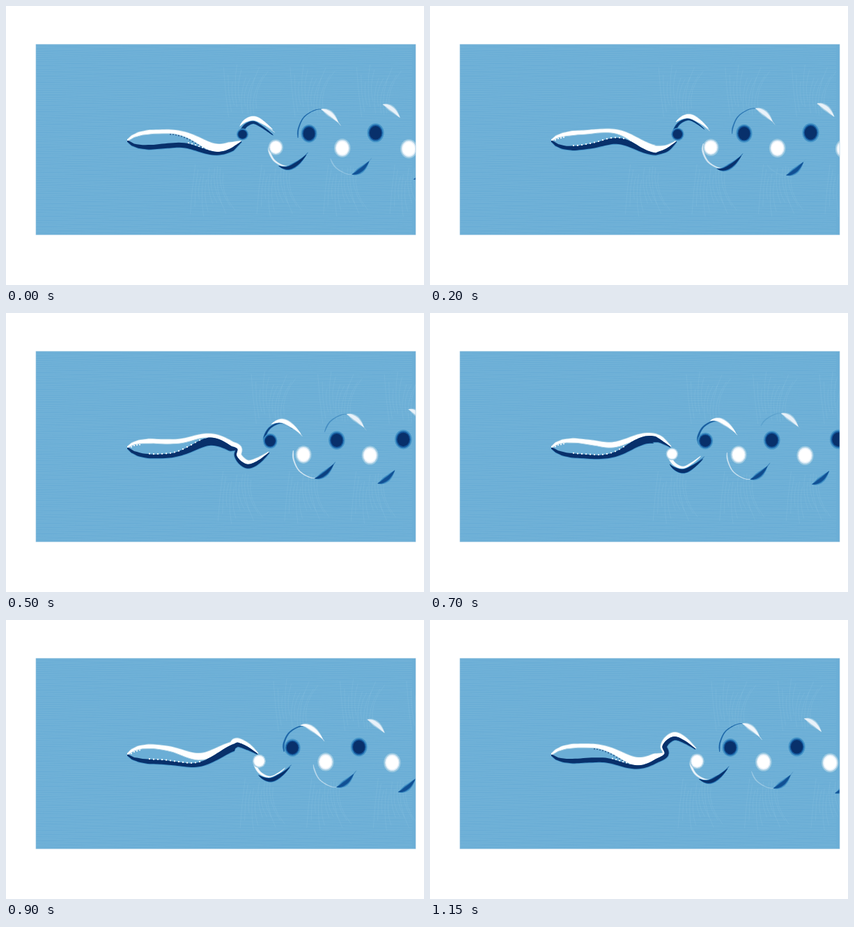
Animation of 600x400 px, one loop 1.2 s. Source, as an HTML page with a canvas:

```html
<!DOCTYPE html>
<html lang="en">
<head>
<meta charset="utf-8">
<title>Swimmer wake</title>
<style>
  html, body { margin: 0; width: 100%; height: 100%; overflow: hidden; background: #fff; }
  canvas { display: block; }
</style>
</head>
<body>
<canvas id="stage" width="600" height="400"></canvas>
<script>
const ctx = document.getElementById('stage').getContext('2d');
const LOOP = 1200, STEP = 50;
const BOX = { x: 43, y: 55, w: 545, h: 273 };
const MID = 193, NOSE = 174, SHED = 339.5, WAVE = 95.5;
const SEA = '#6baed6';
const DARK = ['#4292c6', '#155a9f', '#08306b'];
const LIGHT = ['#9ecae1', '#e3eef8', '#ffffff'];

const clamp = (v, a = 0, b = 1) => Math.min(b, Math.max(a, v));
const mix = (a, b, k) => a + (b - a) * k;
const mixAll = (a, b, k) => a.map((v, i) => mix(v, b[i], k));

function seeded(seed) {
  return () => {
    seed = (seed * 16807) % 2147483647;
    return seed / 2147483647;
  };
}

// Piecewise linear lookup in [x, value] pairs
function lookup(table, x) {
  let i = 1;
  while (i < table.length - 1 && table[i][0] < x) i++;
  const [a, b] = [table[i - 1], table[i]];
  return mix(a[1], b[1], clamp((x - a[0]) / (b[0] - a[0])));
}

// Catmull-Rom through points of any dimension
function spline(pts, n = 8) {
  const out = [], last = pts.length - 1;
  for (let i = 0; i < last; i++) {
    const [a, b, c, d] = [pts[Math.max(0, i - 1)], pts[i], pts[i + 1], pts[Math.min(last, i + 2)]];
    for (let j = 0; j < n; j++) {
      const t = j / n;
      out.push(b.map((v, m) => v + 0.5 * t * (c[m] - a[m] +
        t * (2 * a[m] - 5 * v + 4 * c[m] - d[m] + t * (3 * (v - c[m]) + d[m] - a[m])))));
    }
  }
  out.push(pts[last]);
  return out;
}

// Unit normal on the left of the direction of travel
function normal(pts, i) {
  const a = pts[Math.max(0, i - 1)], b = pts[Math.min(pts.length - 1, i + 1)];
  const dx = b[0] - a[0], dy = b[1] - a[1], len = Math.hypot(dx, dy) || 1;
  return [dy / len, -dx / len];
}

// Fills the strip between two offsets of a path
function strip(pts, from, to, color) {
  const edge = off => pts.map((p, i) => {
    const n = normal(pts, i), d = off(p, i / (pts.length - 1));
    return [p[0] + n[0] * d, p[1] + n[1] * d];
  });
  fillPath(edge(from).concat(edge(to).reverse()), color);
}

function fillPath(pts, color) {
  ctx.fillStyle = color;
  ctx.beginPath();
  pts.forEach(p => ctx.lineTo(p[0], p[1]));
  ctx.closePath();
  ctx.fill();
}

function dot(x, y, r, color) {
  ctx.fillStyle = color;
  ctx.beginPath();
  ctx.arc(x, y, r, 0, 7);
  ctx.fill();
}

// Body: a wave that travels and grows towards the tail
const HALF = [[174, 1.5], [180, 7], [190, 11.5], [205, 14], [235, 13.2], [265, 10.5], [290, 8.6], [326, 6.8]];
const HOLLOW = [[176, 0], [184, 4.5], [195, 7], [212, 7.8], [240, 6.5], [265, 3.2], [288, 0]];

function sway(x, t) {
  const amp = 0.8 + 13.8 / (1 + Math.exp((266 - x) / 19));
  return amp * Math.cos(2 * Math.PI * (t - (x - 300) * 7.5) / LOOP) * clamp((x - NOSE) / 20);
}

const sheetY = (x, t) => MID + 1.25 * sway(x, t);

function bodyPoint(x, t) {
  const half = lookup(HALF, x), lean = 0.25 * sway(x, t);
  return [x, sheetY(x, t), half + lean, half - lean];
}

// Shape of the sheet as it rolls up, relative to its vortex
const ROLL = [[1, -1], [-4, -13], [3, -24], [16, -29], [30, -22], [46, -10]];
const FLAT_X = [0, 6, 12, 18, 32, 46];

function newestSheet(t) {
  const s = t < LOOP / 2 ? -1 : 1;
  const x0 = SHED - WAVE / 2 + WAVE * (t % (LOOP / 2)) / LOOP;
  const r = clamp((x0 - 316) / 24);
  const end = x0 < 316 ? 324 : Math.min(324, x0 - 8);
  const pts = [];
  for (let x = NOSE; x < end; x += 3) pts.push(bodyPoint(x, t));
  const tail = [bodyPoint(end, t)];
  ROLL.forEach((p, i) => {
    const fx = x0 + FLAT_X[i];
    const fy = i < 4 ? sheetY(fx, t) : MID - s * (i === 4 ? 11 : 1);
    if (r === 0 && fx <= end + 3) return;
    const main = mix([6.5, 6.5, 6.5, 6, 4.5, 1][i], [6, 6.5, 6, 5, 3.5, 1][i], r);
    const other = mix([6.5, 6.5, 6.5, 6, 4.5, 1][i], [2, 1.5, 4, 6, 4.5, 1][i], r);
    tail.push([
      mix(fx, x0 + p[0], r), mix(fy, MID + s * p[1], r),
      s > 0 ? other : main, s > 0 ? main : other
    ]);
  });
  return pts.concat(spline(tail));
}

function drawSwimmer(t) {
  const sheet = newestSheet(t);
  const zero = () => 0;
  strip(sheet, zero, p => p[2] + 0.9, LIGHT[0]);
  strip(sheet, zero, p => -p[3] - 0.9, DARK[0]);
  strip(sheet, zero, p => p[2], LIGHT[2]);
  strip(sheet, zero, p => -p[3], DARK[2]);

  const top = [], bottom = [];
  for (let x = 176; x <= 288; x += 4) {
    const y = sheetY(x, t), h = lookup(HOLLOW, x);
    top.push([x, y - h]);
    bottom.push([x, y + h]);
  }
  fillPath(top.concat(bottom.reverse()), SEA);
  ctx.strokeStyle = LIGHT[0];
  ctx.lineWidth = 1;
  ctx.beginPath();
  top.forEach(p => ctx.lineTo(p[0], p[1]));
  ctx.stroke();

  // Specks along the inner skin
  if (t >= 200 && t < 1000) {
    for (let x = 206; x < 284; x += 6)
      dot(x, sheetY(x, t) + lookup(HOLLOW, x) - 0.5, 1.1, '#fff');
    for (let x = 180; x < 196; x += 4)
      dot(x, sheetY(x, t) - lookup(HOLLOW, x) + 1, 1, '#fff');
  } else {
    for (let x = 236; x < 286; x += 4)
      dot(x, sheetY(x, t) - lookup(HOLLOW, x) + 1, 0.8, DARK[2]);
    for (let x = 262; x < 284; x += 5)
      dot(x, sheetY(x, t) + lookup(HOLLOW, x) - 1, 1, '#fff');
  }
}

// Wake: mirrored vortices with an arm and a satellite
const ARM_YOUNG = [[0, -5], ...ROLL.slice(1)];
const ARM_OLD = [[-16, -4], [-15, -18], [-6, -35], [14, -45], [31, -38], [46, -21]];

function layered(pts, colors, width, offset, solid, alpha) {
  const grow = [1, mix(0.62, 0.88, solid), mix(0.3, 0.76, solid)];
  grow.forEach((g, i) => {
    ctx.globalAlpha = alpha * (i === 2 ? clamp(solid * 2) : 1);
    strip(pts, (p, u) => offset + width(u) * g / 2, (p, u) => offset - width(u) * g / 2, colors[i]);
  });
  ctx.globalAlpha = 1;
}

function drawArm(x0, s) {
  const k = (x0 - SHED) / WAVE, old = clamp(k) ** 0.8, drift = 7 * Math.max(0, k - 1);
  const arm = spline(ARM_YOUNG.map((p, i) => {
    const [x, y] = mixAll(p, ARM_OLD[i], old);
    return [x0 + x - drift, MID + s * (y - drift)];
  }), 12);
  const part = (a, b) => arm.slice(Math.round(a * 60), Math.round(b * 60) + 1);
  const [main, other] = s > 0 ? [DARK, LIGHT] : [LIGHT, DARK];

  const fade = clamp((1.7 - k) / 0.7);
  if (fade > 0) {
    const w = mix(7.5, 2.6, old);
    layered(part(clamp(k - 1) * 0.5, mix(1, 0.68, old)), main,
      u => w * (1 - u) ** 0.5 * clamp(0.4 + u * 4), -s * mix(3, 0, old), clamp(1 - 1.5 * k), 0.85 * fade);
  }

  const mid = mix(0.62, 0.79, old), span = mix(0.32, 0.15, clamp(k));
  const out = s * mix(3, 0, old);
  const thread = clamp(1.7 - k) * 0.8;
  if (thread > 0) layered(part(mid, 1), other, u => 2.6 * (1 - u) ** 0.5, out * 0.5, 0, thread);
  const wide = mix(7, 9, clamp(k));
  layered(part(mid - span, Math.min(1, mid + span)), other,
    u => wide * Math.sin(Math.PI * u) ** 0.9, out, clamp(1 - 0.75 * k, 0.12, 1), 1);
}

function drawCore(x0, s) {
  const k = (x0 - SHED) / WAVE;
  const r = 8.5 + 3 * clamp(k * 1.4) + 0.5 * Math.max(0, k - 1);
  const y = MID - s * (9 + 1.1 * k), colors = s > 0 ? DARK : LIGHT;
  [1, 0.85, 0.72].forEach((g, i) => {
    ctx.fillStyle = colors[i];
    ctx.beginPath();
    ctx.ellipse(x0, y, r * g, r * g * (1 + 0.13 * clamp(k)), 0, 0, 7);
    ctx.fill();
  });
}

// Faint contour texture
function drawSea() {
  ctx.fillStyle = SEA;
  ctx.fillRect(BOX.x, BOX.y, BOX.w, BOX.h);
  const rnd = seeded(41);
  ctx.strokeStyle = 'rgba(160,205,230,.26)';
  ctx.lineWidth = 0.6;
  ctx.beginPath();
  for (let y = BOX.y + 2; y < BOX.y + BOX.h; y += 3) {
    const ph = rnd() * 6;
    for (let x = BOX.x; x <= BOX.x + BOX.w; x += 6) {
      const yy = y + 0.5 * Math.sin(x / 17 + ph);
      x === BOX.x ? ctx.moveTo(x, yy) : ctx.lineTo(x, yy);
    }
  }
  ctx.stroke();
}

function drawStreaks(x0, s) {
  const rnd = seeded(97);
  ctx.strokeStyle = 'rgba(160,205,230,.28)';
  ctx.lineWidth = 0.6;
  ctx.beginPath();
  for (let i = 0; i < 11; i++) {
    const x = x0 + (i - 5) * 4, a = 34 + rnd() * 25, b = 75 + rnd() * 40, lean = (i - 3) * 2.4;
    ctx.moveTo(x, MID - s * a);
    ctx.quadraticCurveTo(x - 5, MID - s * (a + b) / 2, x + lean, MID - s * b);
  }
  ctx.stroke();
}

function draw(t) {
  ctx.fillStyle = '#fff';
  ctx.fillRect(0, 0, 600, 400);
  ctx.save();
  ctx.beginPath();
  ctx.rect(BOX.x, BOX.y, BOX.w, BOX.h);
  ctx.clip();
  drawSea();

  const units = [];
  for (let n = -1; n < 7; n++) {
    const x0 = SHED + WAVE * (t / LOOP + n / 2);
    units.push([x0, n % 2 ? -1 : 1]);
  }
  units.forEach(u => drawStreaks(...u));
  const shed = units.filter(u => u[0] >= SHED - 0.01).reverse();
  shed.forEach(u => drawArm(...u));
  drawSwimmer(t);
  shed.forEach(u => drawCore(...u));
  ctx.restore();

  ctx.strokeStyle = '#8fbfdd';
  ctx.lineWidth = 0.6;
  ctx.strokeRect(BOX.x, BOX.y, BOX.w, BOX.h);
}

function frame() {
  draw(Math.floor(performance.now() % LOOP / STEP) * STEP);
  requestAnimationFrame(frame);
}
frame();
</script>
</body>
</html>
```
